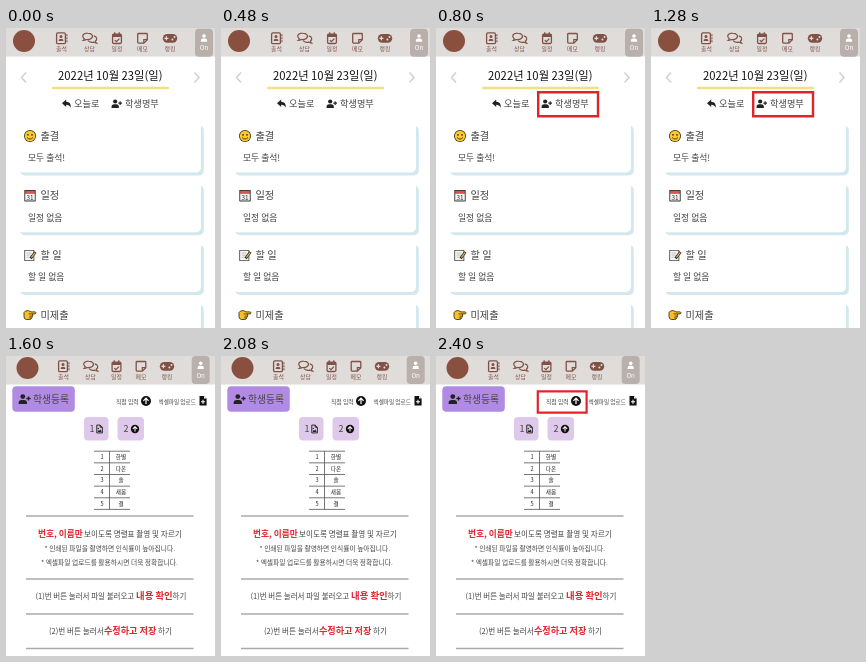
An HTML page with a canvas that plays this animation: 209 px wide and 300 px high, repeating every 3200 ms.

```html
<!DOCTYPE html>
<html lang="ko">
<head>
<meta charset="utf-8">
<style>
html, body { margin: 0; width: 100%; height: 100%; overflow: hidden; background: #fff; }
canvas { display: block; width: 209px; height: 300px; }
</style>
</head>
<body>
<canvas id="stage"></canvas>
<script>
const W = 209, H = 300, STEP = 800;
const BROWN = '#805247', INK = '#222', SOFT = '#444', RED = '#e0242c', PANEL = '#dfdcda';
const canvas = document.getElementById('stage');
const ctx = canvas.getContext('2d');
const ratio = window.devicePixelRatio || 1;
canvas.width = W * ratio;
canvas.height = H * ratio;

function text(str, x, y, size, color = SOFT, weight = 400, align = 'left') {
  ctx.font = `${weight} ${size}px "Noto Sans CJK KR", "Noto Sans CJK", "Noto Sans CJK JP", sans-serif`;
  ctx.fillStyle = color;
  ctx.textAlign = align;
  ctx.fillText(str, x, y);
}

function box(x, y, w, h, r, color) {
  ctx.fillStyle = color;
  ctx.beginPath();
  ctx.roundRect(x, y, w, h, r);
  ctx.fill();
}

function frame(x, y, w, h, r, color, width) {
  ctx.strokeStyle = color;
  ctx.lineWidth = width;
  ctx.beginPath();
  ctx.roundRect(x, y, w, h, r);
  ctx.stroke();
}

function disc(x, y, r, color) {
  ctx.fillStyle = color;
  ctx.beginPath();
  ctx.arc(x, y, r, 0, Math.PI * 2);
  ctx.fill();
}

function line(d, color, width) {
  ctx.strokeStyle = color;
  ctx.lineWidth = width;
  ctx.stroke(new Path2D(d));
}

function shape(d, color) {
  ctx.fillStyle = color;
  ctx.fill(new Path2D(d));
}

function at(x, y, draw, scale = 1) {
  ctx.save();
  ctx.translate(x, y);
  ctx.scale(scale, scale);
  draw();
  ctx.restore();
}

function person(color) {
  disc(0, -2.9, 2.4, color);
  shape('M-4.2 4.6V3.4Q-4.2 .4-1.2 .4H1.2Q4.2 .4 4.2 3.4V4.6Z', color);
}

function personPlus() {
  person(INK);
  line('M3.6-1H7.8M5.7-3.1V1.1', INK, 1.3);
}

function upArrow() {
  disc(0, 0, 5, '#111');
  line('M0 3V-2.6M-2.6-.2L0-2.8L2.6-.2', '#fff', 1.2);
}

function plusFile() {
  shape('M-3.5-4.8H1L3.6-2.2V4.8H-3.5Z', '#111');
  shape('M1-4.8V-2.2H3.6Z', '#fff');
  line('M0-1V3M-2 1H2', '#fff', 1.1);
}

function imageFile() {
  line('M-3.2-4.6H.8L3.4-2V4.6H-3.2ZM.8-4.6V-2H3.4', INK, 1.1);
  shape('M-2.2 3.4L-.9 1L0 2L1 .4L2.5 3.4Z', INK);
  disc(-1.3-.1, -.6, .8, INK);
}

const navIcons = [
  () => {
    frame(-4.9, -5.4, 8.8, 10.8, 1.3, BROWN, 1.3);
    disc(-.5, -1.7, 1.5, BROWN);
    shape('M-3 2.7Q-3 .5-.5 .5Q2 .5 2 2.7Z', BROWN);
    line('M5.4-4V-2M5.4-1V1M5.4 2V4', BROWN, 1.1);
  },
  () => {
    line('M-6.3 2.2Q-5.2 1.3-5.2 .5C-9-3.2-4.8-5.3-2-5.2C2.8-5.2 4.2-1.8 1.7 .2C-.4 1.9-2.5 1.4-3.5 1.2Q-4.6 2.2-6.3 2.2Z', BROWN, 1.2);
    line('M4.2-2.5C8-1.7 7.8 1.5 5.8 2.9Q6.2 4.2 7 4.8Q5.4 4.8 4.2 3.8C1.5 4.3-.7 3.5-1.4 2.2', BROWN, 1.2);
  },
  () => {
    frame(-4.4, -4.2, 8.8, 9.4, 1.2, BROWN, 1.3);
    box(-4.5, -4.3, 9, 3, 1, BROWN);
    line('M-2.3-6V-3M2.3-6V-3M-2.2 1.8L-.6 3.3L2.4 .3', BROWN, 1.3);
  },
  () => {
    line('M-4-4.8H4Q4.8-4.8 4.8-4V1.4L1.4 4.8H-4Q-4.8 4.8-4.8 4V-4Q-4.8-4.8-4-4.8Z', BROWN, 1.3);
    line('M1.3 4.8V1.3H4.8', BROWN, 1.2);
  },
  () => {
    box(-7.2, -4.4, 14.4, 8.8, 4.4, BROWN);
    line('M-5.6 0H-1.6M-3.6-2V2', PANEL, 1.2);
    disc(2.4, 1.2, 1, PANEL);
    disc(4.5, -1.2, 1, PANEL);
  }
];

function header(centers, logoX, logoY, buttonX, buttonY) {
  box(0, 0, W, 28.5, 0, PANEL);
  disc(logoX, logoY, 11, '#89503f');
  ['출석', '상담', '일정', '메모', '랭킹'].forEach((label, i) => {
    at(centers[i], 10.3, navIcons[i]);
    text(label, centers[i], 22.5, 5.9, BROWN, 500, 'center');
  });
  box(buttonX, buttonY, 18, 28, 4, '#b9b0ab');
  at(buttonX + 9, buttonY + 9.5, () => person('#fff'), .75);
  text('On', buttonX + 9, buttonY + 21.5, 6.3, '#fff', 400, 'center');
}

function smile() {
  disc(0, 0, 6, '#3d3214');
  disc(0, 0, 5.2, '#fcc934');
  disc(-2, -1.2, .9, '#3d3214');
  disc(2, -1.2, .9, '#3d3214');
  line('M-3 1.5Q0 4.6 3 1.5', '#3d3214', .9);
}

function calendar() {
  box(-5.7, -5.7, 11.4, 11.4, .6, '#3c3535');
  box(-4.8, -2.2, 9.6, 7, 0, '#f4f4f4');
  box(-4.8, -4.8, 9.6, 2.4, 0, '#e0524c');
  text('31', 0, 4, 6.4, '#333', 500, 'center');
}

function memo() {
  box(-5.7, -5.5, 10, 11.2, .6, '#3c3c3c');
  box(-4.9, -4.7, 8.4, 9.6, 0, '#f7f7f5');
  line('M-3.5-2.4H1.5M-3.5-.3H1M-3.5 1.8H-.5', '#aaa', .7);
  line('M5.4-3.4L.6 3', '#2f2a22', 2.7);
  line('M5-2.8L1.4 2', '#eeb65a', 1.2);
}

function finger() {
  const hand = 'M-6-2.5Q-5-4.8-1.5-4.5L1-3.2H5.3Q6.8-2.4 5.3-1.2H2.1Q3.7 0 2.3 1Q2.8 2.3 1.5 2.8Q1.5 4.2-.3 4.4H-3.7Q-6 3.8-6 1.5Z';
  shape(hand, '#f8c02c');
  line(hand, '#3d3214', .9);
  line('M-1.5-1.2H2.1M-.5 1H2.3M-.8 2.8H1.5', '#3d3214', .8);
}

const cards = [
  ['출결', '모두 출석!', smile],
  ['일정', '일정 없음', calendar],
  ['할 일', '할 일 없음', memo],
  ['미제출', '', finger]
];

function homePage() {
  header([55.5, 83.5, 111, 136.5, 164], 18, 13, 189, .7);
  line('M20 44.5L15.5 49.5L20 54.5M188.5 44.5L193 49.5L188.5 54.5', '#cfcfcf', 1.4);
  text('2022년 10월 23일(일)', 104.3, 52, 11.3, '#111', 500, 'center');
  box(46, 58.8, 117, 2.5, 1, '#f1df83');
  shape('M56 75.2L60.2 71.4V73.7Q65.4 73.7 64.7 79.8Q63.5 76.8 60.2 76.8V79Z', INK);
  text('오늘로', 68, 79, 9.2);
  at(109.2, 76, personPlus, .87);
  text('학생명부', 119, 79, 9.2);
  cards.forEach(([title, note, icon], i) => {
    const y = 97.5 + i * 59.7;
    box(14, y, 183.8, 50, 5, '#d3e8ee');
    box(11, y - 3, 184, 50, 5, '#fff');
    at(24, y + 10.5, icon);
    text(title, 34.5, y + 14, 10.2);
    text(note, 22, y + 35.5, 8.8);
  });
}

function studentTable() {
  const top = 95.2, row = 11.65;
  ['한별', '다온', '솔', '새봄', '결'].forEach((name, i) => {
    const y = top + i * row;
    line(`M88 ${y}H124`, '#555', .8);
    text(i + 1, 96, y + 7.9, 5.6, INK, 500, 'center');
    text(name, 115, y + 7.9, 5.6, INK, 500, 'center');
  });
  line('M88 153.4H124M103.5 95.2V153.4', '#555', .8);
}

function registerPage() {
  header([57.5, 84.5, 110.5, 135, 161], 21.5, 12, 185.7, 0);
  box(6.3, 30.3, 62.5, 25.4, 4, '#b18ae3');
  at(16.8, 43.5, personPlus);
  text('학생등록', 27, 46.6, 9.8);
  text('직접 입력', 110, 47.8, 5.8);
  at(140, 45, upArrow);
  text('엑셀파일 업로드', 152.5, 47.8, 5.6);
  at(197, 44.8, plusFile);

  box(78, 61, 24.5, 23.5, 4, '#dec9eb');
  box(111.5, 61, 26.5, 23.5, 4, '#dec9eb');
  text('1', 83.5, 76, 9);
  at(93.5, 73, imageFile, .85);
  text('2', 117.5, 76, 9);
  at(129, 73, upArrow, .84);

  studentTable();
  [160, 223, 258, 292.5].forEach(y => line(`M20 ${y}H187.5`, '#aaa', 1.4));

  text('번호, 이름만', 32, 180.5, 8.7, RED, 700);
  text('보이도록 명렬표 촬영 및 자르기', 78, 180.5, 7.6);
  text('* 인쇄된 파일을 촬영하면 인식률이 높아집니다.', 38.5, 194.5, 6.75);
  text('* 엑셀파일 업로드를 활용하시면 더욱 정확합니다.', 35, 208.5, 6.75);
  text('(1)번 버튼 눌러서 파일 불러오고', 29.5, 243, 7.5);
  text('내용 확인', 130, 243.2, 9.4, RED, 700);
  text('하기', 166.5, 243, 7.5);
  text('(2)번 버튼 눌러서', 43, 277.8, 7.6);
  text('수정하고 저장', 98, 278, 9.1, RED, 700);
  text('하기', 152, 277.8, 7.5);
}

function draw(now) {
  const step = Math.floor(now / STEP) % 4;
  ctx.setTransform(ratio, 0, 0, ratio, 0, 0);
  box(0, 0, W, H, 0, '#fff');
  if (step < 2) homePage();
  else registerPage();
  if (step === 1) frame(102.2, 64.2, 59.8, 24, 0, RED, 2.4);
  if (step === 3) frame(101.8, 35.4, 48.8, 21.2, 0, RED, 2.2);
}

let start;
function tick(now) {
  start ??= now;
  draw(now - start);
  requestAnimationFrame(tick);
}
requestAnimationFrame(tick);
</script>
</body>
</html>
```
